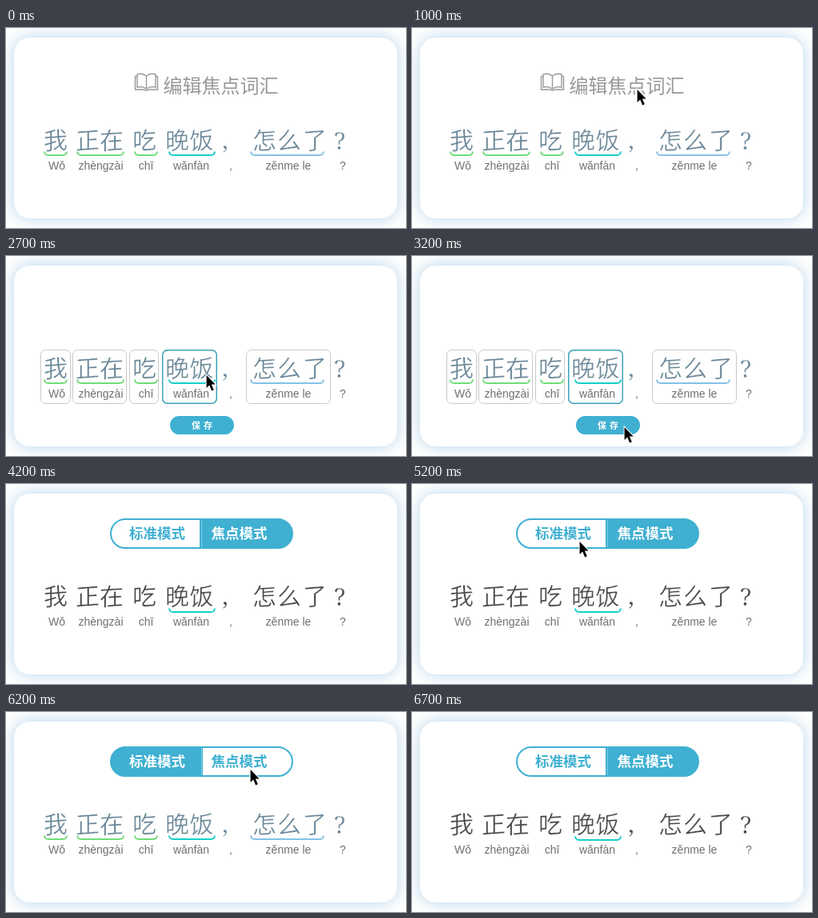
Recreate the animation shown at these times as an HTML page. Size 500 by 250 pixels, loop 7700 ms.

```html
<!DOCTYPE html>
<html lang="zh-CN">
<head>
<meta charset="utf-8">
<title>焦点词汇</title>
<style>
html, body { margin: 0; width: 100%; height: 100%; overflow: hidden; background: #fff; }
.card {
  position: absolute; left: 10px; top: 12px; width: 479px; height: 226px;
  border-radius: 20px; background: #fff; box-shadow: 0 0 20px rgba(130, 180, 215, .58);
}
svg { position: absolute; left: 0; top: 0; display: block; }
text { text-anchor: middle; font-family: "Noto Sans CJK SC", "Noto Sans CJK", sans-serif; }
/* thin, slightly rising strokes for a brush-like look */
.hanzi text {
  font-size: 30px; font-weight: 300; stroke: #fff; stroke-width: .4;
  transform-box: fill-box; transform-origin: center; transform: skewY(-4deg);
}
.hanzi .mark { font-family: "Noto Serif", serif; font-size: 30px; transform: none; }
.pinyin text { font: 14px "Liberation Sans", Arial, sans-serif; fill: #707070; }
.toggle text { font-size: 17.5px; font-weight: 700; }
.line { fill: none; stroke-width: 2; }
</style>
</head>
<body>
<div class="card"></div>
<svg id="stage" width="500" height="250" viewBox="0 0 500 250"></svg>
<script>
const LOOP = 7700;
const BLUE = '#3fb0d2';
const stage = document.getElementById('stage');

// start time, visible layers, cursor position
const STEPS = [
  [0, 'title tinted'],
  [1000, 'title tinted', [280, 74]],
  [1500, 'tinted editor', [250, 103]],
  [1700, 'tinted editor', [249, 146]],
  [2700, 'tinted editor picked', [249, 146]],
  [3200, 'tinted editor picked', [264, 211]],
  [4200, 'plain standard'],
  [5200, 'plain standard', [208, 69]],
  [5700, 'tinted focus', [208, 69]],
  [6200, 'tinted focus', [304, 69]],
  [6700, 'plain standard']
];

// characters with centres, underline span and colour, box span
const WORDS = [
  { chars: '我', at: [62], line: [47, 77], color: '#6fdc78', box: [43, 81] },
  { chars: '正在', at: [102, 132], line: [88, 148], color: '#6fdc78', box: [83, 151] },
  { chars: '吃', at: [173], line: [160, 190], color: '#6fdc78', box: [154, 191] },
  { chars: '晚饭', at: [214, 244.5], line: [203, 262], color: '#14d0c8', box: [195, 264] },
  { chars: '怎么了', at: [323, 354, 386], line: [305, 398], color: '#84c1e6', box: [300, 406] }
];
const PINYIN = [['Wǒ', 63.5], ['zhèngzài', 118.5], ['chī', 175], ['wǎnfàn', 231.5],
  [',', 281], ['zěnme le', 353], ['?', 421]];

const label = (str, x, y, attrs = '') => `<text x="${x}" y="${y}" ${attrs}>${str}</text>`;

const underline = ({ line: [a, b], color }, y) =>
  `<path class="line" stroke="${color}" d="M${a + 1} ${y - 4.5}Q${a + 1.5} ${y} ${a + 6} ${y}H${b - 6}Q${b - 1.5} ${y} ${b - 1} ${y - 4.5}"/>`;

const frame = ({ box: [a, b] }, color, width) =>
  `<rect x="${a + width / 2}" y="${117 + width / 2}" width="${b - a - width}" height="${68 - width}"
    rx="6" fill="none" stroke="${color}" stroke-width="${width}"/>`;

const sentence = color => `<g class="hanzi" fill="${color}">` +
  WORDS.map(w => [...w.chars].map((c, i) => label(c, w.at[i], 151.5)).join('')).join('') +
  label(',', 274, 151, 'class="mark"') + label('?', 417, 151.5, 'class="mark"') + '</g>';

function toggle(focus) {
  const half = focus
    ? 'M246 44H149A18 18 0 0 0 149 80H246Z'
    : 'M242 44H340A18 18 0 0 1 340 80H242Z';
  return `<g class="toggle">
    <rect x="131" y="44" width="227" height="36" rx="18" fill="#fff" stroke="${BLUE}" stroke-width="2"/>
    <path d="${half}" fill="${BLUE}"/>
    <path d="M244.5 45V79" stroke="#fff" stroke-opacity=".35"/>
    ${label('标准模式', 189, 67.8, `fill="${focus ? '#fff' : BLUE}"`)}
    ${label('焦点模式', 291.5, 67.8, `fill="${focus ? BLUE : '#fff'}"`)}</g>`;
}

const LAYERS = {
  title: `<g fill="none" stroke="#999" stroke-width="1.4">
      <path d="M175.5 60C172 57 167 57 164 58V74C168 73 172 73.5 175.5 76C179 73.5 183 73 187 74V58C184 57 179 57 175.5 60V76"/>
      <path d="M164 60.5H161.5V77H173Q175.5 79 178 77H189.5V60.5H187"/></g>` +
    label('编辑焦点词汇', 268.5, 81, 'font-size="24" font-weight="500" fill="#999"'),
  tinted: sentence('#6a8798') + WORDS.map(w => underline(w, 159)).join(''),
  plain: sentence('#484848') + underline(WORDS[3], 160),
  editor: WORDS.map(w => frame(w, '#c9c9c9', 1)).join('') +
    `<rect x="205" y="200" width="80" height="23" rx="11.5" fill="${BLUE}"/>` +
    label('保', 237.5, 215.5, 'font-size="11" font-weight="700" fill="#fff"') +
    label('存', 252.5, 215.5, 'font-size="11" font-weight="700" fill="#fff"'),
  picked: frame(WORDS[3], '#3aa3bb', 1.5),
  standard: toggle(false),
  focus: toggle(true),
  cursor: `<path d="M1.6 3V19L5.2 15.6L8.1 22.5L10.8 21.3L7.9 14.6H12.6Z"
    fill="#000" stroke="#fff" stroke-width="2" paint-order="stroke"/>`
};

stage.innerHTML = `<g class="pinyin">${PINYIN.map(([s, x]) => label(s, x, 177)).join('')}</g>` +
  Object.entries(LAYERS).map(([id, art]) => `<g id="${id}">${art}</g>`).join('');

// Holds each value until the next step, with no blending.
function play(id, valueAt) {
  const keys = STEPS.map(step => ({ ...valueAt(step), offset: step[0] / LOOP, easing: 'step-end' }));
  keys.push({ ...keys[keys.length - 1], offset: 1 });
  document.getElementById(id).animate(keys, { duration: LOOP, iterations: Infinity });
}

for (const id of Object.keys(LAYERS)) {
  if (id === 'cursor') {
    play(id, ([, , pos]) => ({
      opacity: pos ? 1 : 0,
      transform: `translate(${pos ? pos[0] : 0}px, ${pos ? pos[1] : 0}px)`
    }));
  } else {
    play(id, ([, layers]) => ({ opacity: layers.split(' ').includes(id) ? 1 : 0 }));
  }
}
</script>
</body>
</html>
```
